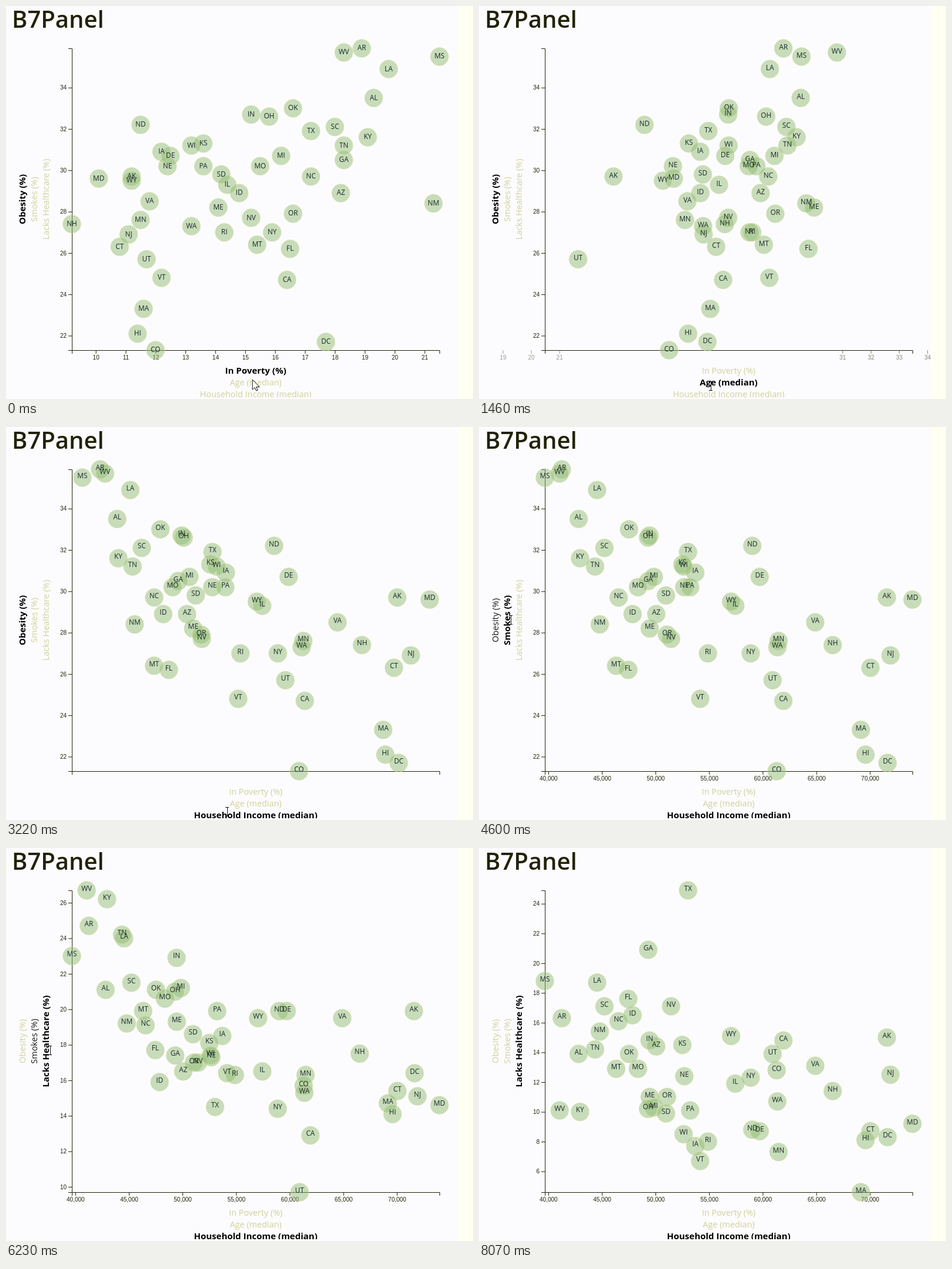
These frames come from a looping animation (794 px wide and 668 px high, 8.11 s). An HTML page with a canvas:

```html
<!DOCTYPE html>
<html lang="en">
<head>
<meta charset="utf-8">
<style>
html, body { margin: 0; width: 100%; height: 100%; overflow: hidden; background: #fcfcfe; }
canvas { display: block; }
</style>
</head>
<body>
<canvas width="794" height="668"></canvas>
<script>
const ctx = document.querySelector('canvas').getContext('2d');
const LOOP = 8110, DURATION = 1000, FADE = 300;
const LEFT = 112, RIGHT = 737, TOP = 72, BOTTOM = 585;
const INK = '#222208', SANS = '"Open Sans", "Noto Sans", sans-serif';

const states = ('AL AK AZ AR CA CO CT DE DC FL GA HI ID IL IN IA KS KY LA ME MD MA MI MN MS MO ' +
  'MT NE NV NH NJ NM NY NC ND OH OK OR PA RI SC SD TN TX UT VT VA WA WV WI WY').split(' ');

const metric = (label, step, values) =>
  ({ label, step, values, min: Math.min(...values), max: Math.max(...values) });

const xMetrics = [
  metric('In Poverty (%)', 1, [
    19.3, 11.2, 18.2, 18.9, 16.4, 12, 10.8, 12.5, 17.7, 16.5, 18.3, 11.4, 14.8, 14.4, 15.2, 12.2, 13.6,
    19.1, 19.8, 14.1, 10.1, 11.6, 16.2, 11.5, 21.5, 15.5, 15.4, 12.4, 15.2, 9.2, 11.1, 21.3, 15.9, 17.2,
    11.5, 15.8, 16.6, 16.6, 13.6, 14.3, 18, 14.2, 18.3, 17.2, 11.7, 12.2, 11.8, 13.2, 18.3, 13.2, 11.2]),
  metric('Age (median)', 1, [
    38.6, 33.3, 36.9, 37.8, 36, 36.3, 40.5, 39.6, 33.8, 41.6, 36.1, 38.1, 35.9, 37.5, 37.4, 38.2, 36.2,
    38.5, 36.1, 44.1, 38.3, 39.4, 39.6, 37.8, 36.7, 38.5, 39.6, 36.2, 37.4, 42.5, 39.4, 37.2, 38.2, 38.3,
    35.1, 39.4, 36.2, 39.3, 40.7, 39.8, 38.8, 36.6, 38.6, 34.3, 30.5, 42.8, 37.7, 37.5, 41.9, 39.2, 36.6]),
  metric('Household Income (median)', 5000, [
    42830, 71583, 50068, 41262, 61933, 61303, 70048, 59716, 71648, 47463, 49321, 69592, 47861, 57444, 49446, 53712, 52504,
    42958, 44555, 49462, 73971, 69160, 49847, 61481, 39680, 48363, 46328, 52686, 51450, 66532, 71919, 44803, 58878, 46556,
    59029, 49308, 47529, 51075, 53234, 54891, 45238, 50979, 44361, 53035, 60922, 54166, 64902, 61366, 41059, 52622, 57055])
];
const yMetrics = [
  metric('Obesity (%)', 2, [
    33.5, 29.7, 28.9, 35.9, 24.7, 21.3, 26.3, 30.7, 21.7, 26.2, 30.5, 22.1, 28.9, 29.3, 32.7, 30.9, 31.3,
    31.6, 34.9, 28.2, 29.6, 23.3, 30.7, 27.6, 35.5, 30.2, 26.4, 30.2, 27.7, 27.4, 26.9, 28.4, 27, 29.7,
    32.2, 32.6, 33, 27.9, 30.2, 27, 32.1, 29.8, 31.2, 31.9, 25.7, 24.8, 28.5, 27.3, 35.7, 31.2, 29.5]),
  metric('Smokes (%)', 2, [
    21.1, 19.9, 16.5, 24.7, 12.9, 15.7, 15.4, 19.9, 16.4, 17.7, 17.4, 14.1, 15.9, 16.5, 22.9, 18.5, 18.1,
    26.2, 24, 19.3, 14.6, 14.7, 21.2, 16.3, 23, 20.6, 19.9, 17.3, 17, 17.5, 15.1, 19.2, 14.4, 19.1,
    19.9, 21, 21.1, 17, 19.9, 16.3, 21.5, 18.6, 24.2, 14.5, 9.7, 16.4, 19.5, 15.3, 26.7, 17.4, 19.5]),
  metric('Lacks Healthcare (%)', 2, [
    13.9, 15, 14.4, 16.3, 14.8, 12.8, 8.7, 8.7, 8.3, 17.6, 20.9, 8.1, 16.5, 11.9, 14.8, 7.7, 14.5,
    10, 18.7, 11, 9.2, 4.6, 10.3, 7.3, 18.8, 12.9, 12.9, 12.4, 17.1, 11.4, 12.5, 15.4, 12.3, 16.1,
    8.8, 10.2, 13.9, 11, 10.1, 8, 17.1, 9.9, 14.2, 24.9, 13.9, 6.7, 13.1, 10.7, 10.1, 8.5, 15.1])
];

const xAxis = { metrics: xMetrics, clicks: [942, 2471], from: LEFT, to: RIGHT };
const yAxis = { metrics: yMetrics, clicks: [4590, 6220], from: BOTTOM, to: TOP };

// Pointer stops: time, x, y
const pointer = [[0, 419, 644], [130, 419, 644], [900, 394, 646], [2340, 394, 646], [2440, 376, 654],
  [3500, 376, 654], [4500, 54, 328], [5600, 54, 328], [6100, 75, 344], [7300, 75, 344], [7900, 276, 352]];

const lerp = (a, b, k) => a + (b - a) * k;
const clamp = k => Math.max(0, Math.min(1, k));
const cubicInOut = k => k < .5 ? 4 * k ** 3 : 1 - 4 * (1 - k) ** 3;

function ticks({ min, max, step }) {
  const list = [];
  for (let v = Math.ceil(min / step) * step; v <= max; v += step) list.push(v);
  return list;
}

function axisState(axis, time) {
  const index = axis.clicks.filter(c => time >= c).length;
  const age = index ? time - axis.clicks[index - 1] : Infinity;
  const before = axis.metrics[Math.max(0, index - 1)], now = axis.metrics[index];
  const k = cubicInOut(clamp(age / DURATION));
  const scale = (m, v) => lerp(axis.from, axis.to, (v - m.min) / (m.max - m.min));
  return { index, age, before, now, k,
    at: (a, b = a) => lerp(scale(before, a), scale(now, b), k) };
}

function line(...points) {
  ctx.beginPath();
  points.forEach(([x, y]) => ctx.lineTo(x, y));
  ctx.stroke();
}

function drawTicks(state, drawTick) {
  const old = ticks(state.before), fresh = ticks(state.now);
  for (const v of new Set([...old, ...fresh])) {
    const start = old.includes(v) ? 1 : 0, end = fresh.includes(v) ? 1 : 0;
    ctx.globalAlpha = lerp(start, end, state.k);
    if (ctx.globalAlpha > .005) drawTick(state.at(v), v.toLocaleString('en-US'));
  }
  ctx.globalAlpha = 1;
}

function drawAxes(x, y) {
  ctx.strokeStyle = ctx.fillStyle = INK;
  ctx.lineWidth = 1;
  ctx.font = '10px "Liberation Sans", sans-serif';
  line([LEFT + .5, BOTTOM + 6], [LEFT + .5, BOTTOM + .5], [RIGHT + .5, BOTTOM + .5], [RIGHT + .5, BOTTOM + 6]);
  line([LEFT - 6, TOP + .5], [LEFT + .5, TOP + .5], [LEFT + .5, BOTTOM + .5], [LEFT - 6, BOTTOM + .5]);
  ctx.textAlign = 'center';
  drawTicks(x, (p, text) => {
    line([p + .5, BOTTOM], [p + .5, BOTTOM + 6]);
    ctx.fillText(text, p + .5, BOTTOM + 16);
  });
  ctx.textAlign = 'right';
  drawTicks(y, (p, text) => {
    line([LEFT - 6, p + .5], [LEFT, p + .5]);
    ctx.fillText(text, LEFT - 9, p + 3.7);
  });
}

function drawLabels(axis, state, place) {
  ctx.textAlign = 'center';
  axis.metrics.forEach((m, i) => {
    const active = i === state.index;
    const pale = i === state.index - 1 ? clamp(state.age / FADE) ** 2 : 1;
    const c = lerp(25, 208, pale);
    ctx.fillStyle = active ? '#000' : `rgb(${c},${c},${lerp(20, 155, pale)})`;
    ctx.font = (active ? 'bold 15px ' : '14.4px ') + SANS;
    ctx.save();
    place(i);
    ctx.fillText(m.label, 0, 0);
    ctx.restore();
  });
}

function drawPoints(x, y, lift) {
  const points = states.map((name, i) => [name,
    x.at(x.before.values[i], x.now.values[i]),
    y.at(y.before.values[i], y.now.values[i])]);
  ctx.fillStyle = 'rgba(146,188,116,.5)';
  ctx.strokeStyle = 'rgba(227,227,165,.5)';
  for (const [, cx, cy] of points) {
    ctx.beginPath();
    ctx.arc(cx, cy, 15.5, 0, 7);
    ctx.fill();
    ctx.stroke();
  }
  ctx.fillStyle = '#1c282a';
  ctx.font = '11.8px ' + SANS;
  ctx.textAlign = 'center';
  for (const [name, cx, cy] of points) ctx.fillText(name, cx, cy + lerp(3.4, .8, lift));
}

function drawPointer(time) {
  const next = pointer.findIndex(p => p[0] > time);
  if (next < 0) return;
  const [t0, x0, y0] = pointer[next - 1], [t1, x1, y1] = pointer[next];
  const k = (time - t0) / (t1 - t0);
  ctx.save();
  ctx.translate(lerp(x0, x1, k), lerp(y0, y1, k));
  ctx.lineWidth = 1;
  ctx.strokeStyle = '#111';
  const overText = (time >= 900 && time < 3500) || (time >= 4500 && time < 7300);
  if (overText) {
    line([-3, -7.5], [3, -7.5]);
    line([.5, -7], [.5, 7]);
    line([-3, 7.5], [3, 7.5]);
  } else {
    ctx.fillStyle = '#fff';
    const shape = new Path2D('M0-9V8L4 4.5 6.5 10 9 9 6.5 3.5H12Z');
    ctx.fill(shape);
    ctx.stroke(shape);
  }
  ctx.restore();
}

function draw() {
  const time = performance.now() % LOOP;
  const x = axisState(xAxis, time), y = axisState(yAxis, time);
  ctx.fillStyle = '#fcfcfe';
  ctx.fillRect(0, 0, 794, 668);
  ctx.fillStyle = '#fffff2';
  ctx.fillRect(768, 0, 26, 668);

  ctx.fillStyle = INK;
  ctx.textAlign = 'left';
  ctx.font = '600 40px ' + SANS;
  ctx.fillText('B7Panel', 10, 36.5);

  ctx.save();
  ctx.beginPath();
  ctx.rect(12, 47, 782, 618);
  ctx.clip();
  drawAxes(x, y);
  drawPoints(x, y, x.index > 1 ? 1 : x.index * x.k);
  drawLabels(xAxis, x, i => ctx.translate((LEFT + RIGHT) / 2, 625 + 20 * i));
  drawLabels(yAxis, y, i => {
    ctx.translate(32.5 + 20 * i, (TOP + BOTTOM) / 2);
    ctx.rotate(-Math.PI / 2);
  });
  ctx.restore();
  drawPointer(time);
  requestAnimationFrame(draw);
}
draw();
</script>
</body>
</html>
```
